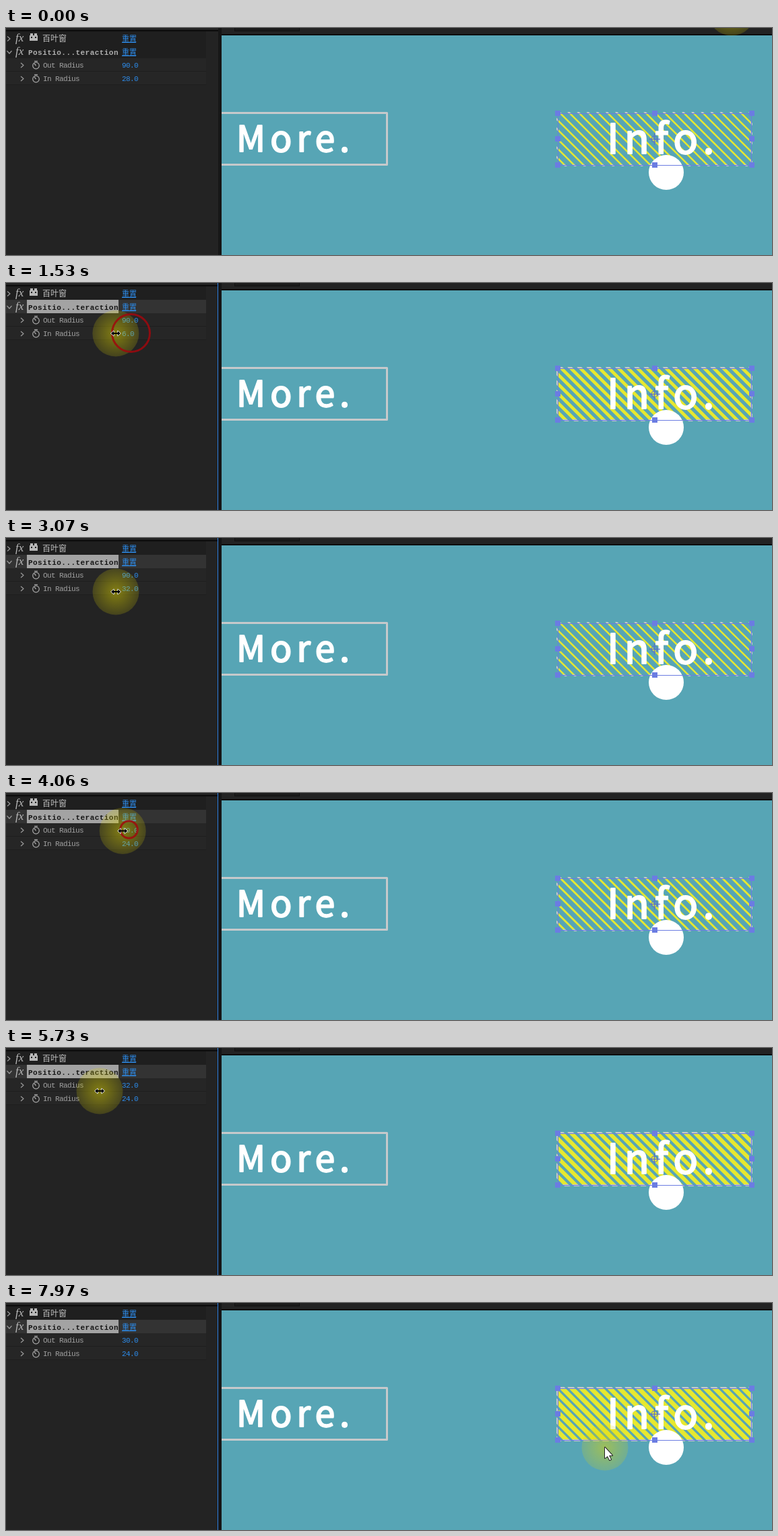
Animation of 1137 by 338 pixels, one loop 8 s. Source, as an HTML page with a canvas:

```html
<!DOCTYPE html>
<html lang="en">
<head>
<meta charset="utf-8">
<style>
html, body { margin: 0; width: 100%; height: 100%; overflow: hidden; background: #232323; }
canvas { display: block; }
</style>
</head>
<body>
<canvas id="stage" width="1137" height="338"></canvas>
<script>
const g = document.getElementById('stage').getContext('2d');
const LOOP = 8000, STEP = 70, PHASE = 60;
const MONO = '"Liberation Mono", monospace', CJK = '"Noto Sans CJK SC", "Noto Sans CJK", sans-serif';
const BLUE = '#2d8ceb', HANDLE = '#6b7ce2', FRAME = '#c6c9cb';
const PRESS_IN = 1000, REGRAB = 2200, RELEASE_IN = 3350, PRESS_OUT = 3870, REGRAB_OUT = 4850, RELEASE_OUT = 7000;

// Pointer moves: start time, end time, destination
const moves = [
  [60, 550, 191, 74], [550, 1000, 185, 75], [1000, 1670, 157, 75], [1740, 2090, 128, 79],
  [2240, 2660, 163, 80], [3070, 3280, 155, 80], [3430, 3640, 182, 55], [3870, 4750, 139, 62],
  [4990, 5360, 146, 63], [5360, 5730, 139, 64], [5800, 6010, 131, 68], [6790, 6930, 137, 68],
  [7340, 7970, 889, 215]];

function pointerAt(t) {
  let x = 1077, y = -23;
  for (const [start, end, toX, toY] of moves) {
    const u = Math.min(1, Math.max(0, (t - start) / (end - start)));
    x += (toX - x) * u;
    y += (toY - y) * u;
  }
  return [x, y];
}

// Dragging scrubs each value by the pointer's x
function inRadius(t) {
  if (t < PRESS_IN) return 28;
  const x = pointerAt(Math.min(t, RELEASE_IN))[0];
  return Math.max(0, Math.round(x - (t < REGRAB ? 157 : 131)));
}

function outRadius(t) {
  if (t < PRESS_OUT) return 90;
  const x = pointerAt(Math.min(t, RELEASE_OUT))[0];
  return Math.round(t < REGRAB_OUT ? 90 - (182 - x) * 1.21 : x - 107);
}

function coverage(t) {
  const a = inRadius(t), b = outRadius(t);
  return Math.max(.25, .54 - a / 95, Math.exp((a - b) / 15));
}

function rect(x, y, w, h, color) {
  g.fillStyle = color;
  g.fillRect(x, y, w, h);
}

function frame(x, y, w, h, color, width) {
  g.strokeStyle = color;
  g.lineWidth = width;
  g.strokeRect(x, y, w, h);
}

function text(s, x, y, font, color, spacing = 0) {
  g.font = font;
  g.letterSpacing = spacing + 'px';
  g.fillStyle = color;
  g.fillText(s, x, y);
}

function disc(x, y, r, fill) {
  g.beginPath();
  g.arc(x, y, r, 0, Math.PI * 2);
  g.fillStyle = fill;
  g.fill();
}

function ring(x, y, r, color, width) {
  g.beginPath();
  g.arc(x, y, r, 0, Math.PI * 2);
  g.strokeStyle = color;
  g.lineWidth = width;
  g.stroke();
}

function line(color, ...pts) {
  g.beginPath();
  for (let i = 0; i < pts.length; i += 2) g.lineTo(pts[i], pts[i + 1]);
  g.strokeStyle = color;
  g.lineWidth = 1.2;
  g.stroke();
}

function label(s, x, y, size, spacing) {
  text(s, x, y, `${size}px ${CJK}`, '#fff', spacing);
  g.strokeStyle = '#fff';
  g.lineWidth = 2;
  g.strokeText(s, x, y);
}

function chevron(x, y, open) {
  if (open) line('#999', x - 3.5, y - 2, x, y + 2, x + 3.5, y - 2);
  else line('#999', x - 2, y - 3.5, x + 2, y, x - 2, y + 3.5);
}

function effectRow(y, selected) {
  rect(0, y - 11, 297, 20, selected ? '#333' : '#1f1f1f');
  text('fx', 14, y + 4, 'italic 17px "Liberation Serif", serif', '#b8b8b8');
  text('重置', 172, y + 4, `11px ${CJK}`, BLUE);
  rect(172, y + 5, 21, 1, BLUE);
}

function propertyRow(name, value, y, color) {
  rect(0, y - 10, 297, 19, '#262626');
  rect(0, y + 9, 297, 1, '#1e1e1e');
  chevron(24, y + .5);
  ring(44.5, y + 1, 4.8, '#aaa', 1.2);
  line('#aaa', 42, y - 5.5, 47, y - 5.5);
  line('#aaa', 44.5, y + 1, 42, y - 2);
  text(name, 55, y + 4, `11px ${MONO}`, '#a0a0a0', -.6);
  text(value.toFixed(1), 172, y + 4, `11px ${MONO}`, color, -.6);
}

function panel(t) {
  const selected = t >= 900, hover = t >= 480 && !selected;
  rect(0, 0, 315, 338, '#232323');
  rect(0, 3, 315, 2, '#0c0c0c');
  effectRow(16, false);
  effectRow(36, selected);
  chevron(4, 16);
  chevron(5, 36, true);
  rect(35, 11, 12, 8, '#b8b8b8');
  for (const x of [36, 42]) {
    rect(x, 8, 4, 3, '#b8b8b8');
    rect(x + 1, 13, 2, 2, '#1f1f1f');
  }
  text('百叶窗', 54, 20, `12px ${CJK}`, '#c0c0c0');
  if (selected) rect(31, 25, 136, 20, '#a3a3a3');
  text('Positio...teraction', 33, 40, `bold 11px ${MONO}`, selected ? '#151515' : '#b0b0b0', .45);
  propertyRow('Out Radius', outRadius(t), 55, BLUE);
  propertyRow('In Radius', inRadius(t), 75, hover ? '#f4f4e0' : BLUE);
  rect(315, 0, 5, 338, '#161616');
  if (selected) rect(314, 0, 1, 338, '#2d7fe0');
}

function button(cover) {
  const period = 10 * Math.SQRT2, x0 = 818, y0 = 126, w = 289, h = 79;
  g.save();
  g.beginPath();
  for (let x = x0 - 7 * period; x < x0 + w + period; x += period) {
    const band = period * cover;
    g.moveTo(x, y0 - 2);
    g.lineTo(x + band, y0 - 2);
    g.lineTo(x + band + h + 4, y0 + h + 2);
    g.lineTo(x + h + 4, y0 + h + 2);
  }
  if (cover < 1) g.clip();
  rect(x0, y0, w, h, '#e6e82f');
  frame(x0 + .5, y0 + .5, w - 1, h - 1, FRAME, 3);
  g.restore();
}

function selection() {
  frame(819.5, 127.5, 287, 77, HANDLE, 1);
  for (const x of [819, 963, 1107]) for (const y of [127, 165, 204])
    if (x !== 963 || y !== 165) rect(x - 4, y - 4, 8, 8, HANDLE);
  ring(962.5, 165.5, 4.5, '#5d70c8', 1.2);
  line('#5d70c8', 954, 165.5, 971, 165.5);
  line('#5d70c8', 962.5, 157, 962.5, 174);
}

function shape(x, y, pts, fill, edge, width) {
  g.beginPath();
  for (let i = 0; i < pts.length; i += 2) g.lineTo(x + pts[i], y + pts[i + 1]);
  g.closePath();
  g.lineJoin = 'round';
  g.strokeStyle = edge;
  g.lineWidth = width;
  g.stroke();
  g.fillStyle = fill;
  g.fill();
}

function arrowHeads(x, y, gap) {
  for (const side of [-1, 1])
    shape(x, y, [side * (gap + 4), 0, side * gap, -3.5, side * gap, 3.5], '#000', '#fff', 1.4);
}

function pointer(t) {
  const [x, y] = pointerAt(t);
  const glow = g.createRadialGradient(x, y, 0, x, y, 34.5);
  glow.addColorStop(0, 'rgba(225,215,0,.5)');
  glow.addColorStop(1, 'rgba(225,215,0,.18)');
  disc(x, y, 34.5, glow);
  for (const press of [PRESS_IN, PRESS_OUT]) {
    const age = t - press, [cx, cy] = pointerAt(press);
    if (age >= 0 && age < 820) ring(cx + .5, cy - .5, 5 + age * .0434, 'rgba(160,8,14,.85)', 3);
  }
  if (t >= PRESS_IN && t < RELEASE_IN || t >= PRESS_OUT && t < RELEASE_OUT) {
    arrowHeads(x, y, 3);
    rect(x - 4, y - 1, 8, 2, '#000');
  } else if (t >= 480 && t < 7400) {
    arrowHeads(x, y, 4);
    shape(x, y, [-4, -3, -2, -4, -1, 2, 6, 3, 7, 8, 4, 14, -2, 14, -7, 8, -6, 6, -3, 8], '#fff', '#000', 2);
  } else
    shape(x, y, [0, 0, 0, 16, 4, 13, 7, 19, 9, 18, 6, 12, 11, 12], '#fff', '#222', 2);
}

function draw(time) {
  const t = Math.floor((time % LOOP - PHASE) / STEP) * STEP + PHASE;
  rect(320, 0, 817, 338, '#57a5b5');
  rect(320, 0, 817, 11, '#232323');
  rect(339, 0, 97, 5, '#111');
  rect(340, 0, 95, 4, '#1b1b1b');
  rect(320, 9, 817, 2, '#0d0d0d');
  frame(300, 126.5, 265.5, 77, FRAME, 3);
  label('More.', 342, 184, 53, 7.2);
  button(coverage(t));
  label('Info.', 892, 186.5, 61, 8);
  disc(980, 215, 26, '#fff');
  selection();
  panel(t);
  pointer(t);
}

function tick() {
  draw(performance.now());
  requestAnimationFrame(tick);
}
tick();
</script>
</body>
</html>
```
